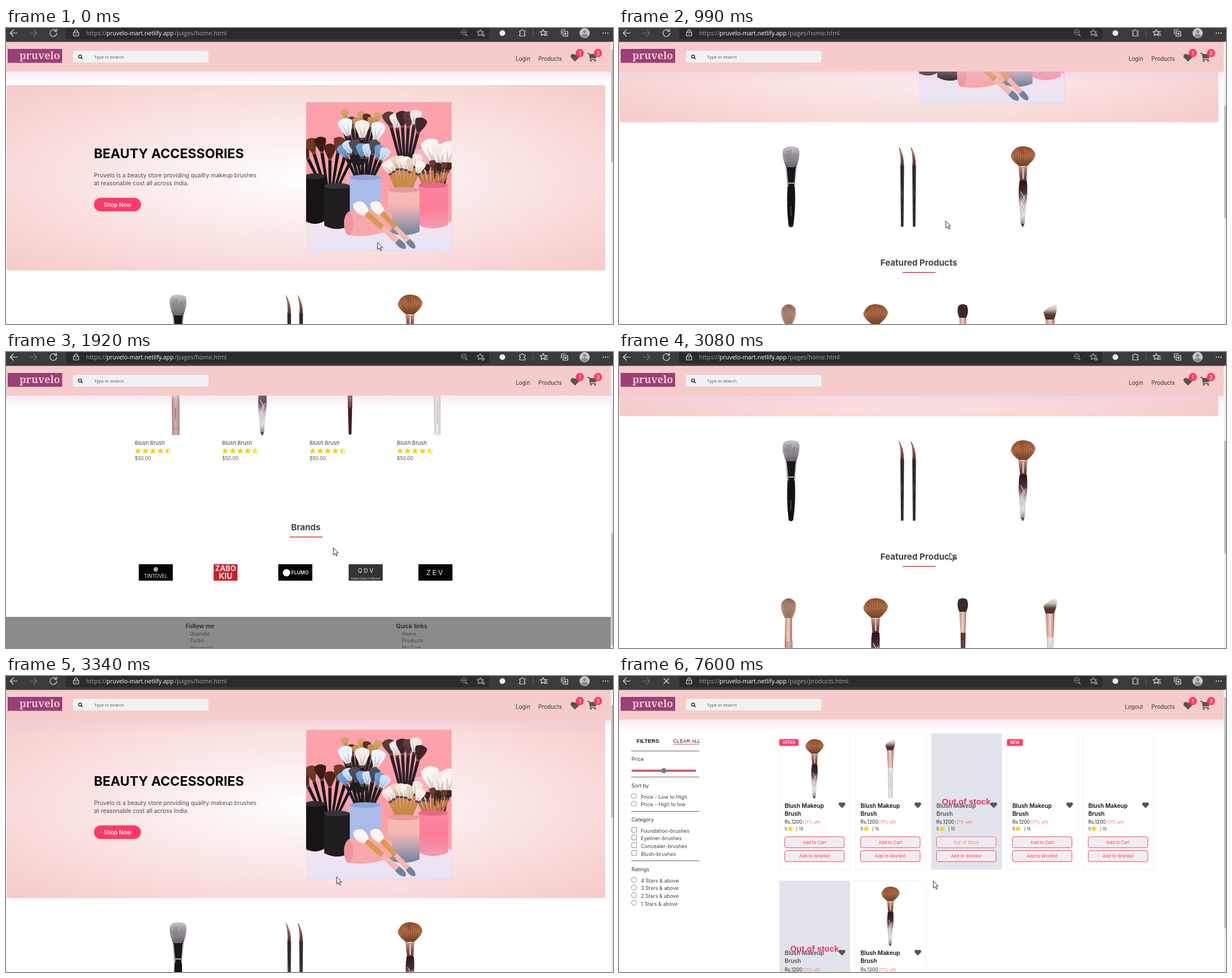
Write an HTML page that moves like this. It is 1070 by 523 pixels and loops after 8000 ms.

```html
<!DOCTYPE html>
<html lang="en">
<head>
<meta charset="utf-8">
<title>Beauty store</title>
<style>
  html, body { margin: 0; width: 100%; height: 100%; overflow: hidden; background: #fff; }
  svg { display: block; width: 1070px; height: 523px; font-family: Inter, sans-serif; }
  .shop { opacity: 0; }
  .arial { font-family: "Liberation Sans", Arial, sans-serif; }
  .ui { font-family: "Open Sans", sans-serif; }
  .serif { font-family: "Noto Serif", serif; }
  .mid { text-anchor: middle; }
  .line { fill: none; stroke: #e4e4e4; stroke-width: 1.2; stroke-linecap: round; stroke-linejoin: round; }
</style>
</head>
<body>
<svg id="stage" viewBox="0 0 1070 523"></svg>
<script>
const LOOP = 8000, SWITCH = 7600, PINK = '#ff3a68', GOLD = '#f9d31b';

// time, page scroll, cursor x, cursor y
const STEPS = [
  [0, 0, 655, 379], [840, 45, 640, 372], [890, 115, 608, 357], [940, 190, 584, 345],
  [990, 262, 576, 341], [1050, 345, 576, 341], [1150, 430, 576, 341],
  [1870, 630, 577, 346], [1920, 745, 577, 346], [2710, 490, 583, 355],
  [3080, 315, 583, 355], [3130, 248, 583, 355], [3180, 180, 583, 355], [3220, 122, 583, 355],
  [3280, 72, 583, 355], [3340, 36, 583, 355], [3400, 12, 583, 355], [3470, 0, 583, 355],
  [SWITCH, 0, 554, 362]
];

let seed = 7;
const rnd = () => (seed = seed * 16807 % 2147483647) / 2147483647;
const range = n => [...Array(n).keys()];
const text = (x, y, s, size, fill = '#333', more = '') =>
  `<text x="${x}" y="${y}" font-size="${size}" fill="${fill}" ${more}>${s}</text>`;
const rect = (x, y, w, h, fill, r = 0, more = '') =>
  `<rect x="${x}" y="${y}" width="${w}" height="${h}" rx="${r}" fill="${fill}" ${more}/>`;
const dot = (x, y, r, fill, more = '') => `<circle cx="${x}" cy="${y}" r="${r}" fill="${fill}" ${more}/>`;
const path = (d, fill, more = '') => `<path d="${d}" fill="${fill}" ${more}/>`;
const line = (d, more = '') => `<path class="line" d="${d}" ${more}/>`;
const at = (x, y, body, more = '') => `<g transform="translate(${x} ${y}) ${more}">${body}</g>`;
const group = (cls, body) => `<g class="${cls}">${body}</g>`;
const grad = (id, stops, dir = 'x2="0" y2="1"') =>
  `<linearGradient id="${id}" ${dir}>${stops.map((c, i) =>
    `<stop offset="${i / (stops.length - 1)}" stop-color="${c}"/>`).join('')}</linearGradient>`;

const starPath = (x, y, r, n = 10) => 'M' + range(n).map(i => {
  const a = i * Math.PI / 5 + Math.PI, q = i % 2 ? r * .48 : r;
  return (x + q * Math.sin(a)).toFixed(2) + ' ' + (y + q * Math.cos(a)).toFixed(2);
}).join('L') + 'Z';
const star = (x, y, r) => path(starPath(x, y, r), GOLD, `stroke="${GOLD}" stroke-linejoin="round"`);
const halfStar = (x, y, r) => path(starPath(x, y, r), 'none', `stroke="${GOLD}"`) + path(starPath(x, y, r, 6), GOLD);
const heart = (x, y, k) => at(x, y, path('M0 7L-6.6 .4C-9.4 -3 -5.2 -9 0 -4.4C5.2 -9 9.4 -3 6.6 .4Z', '#555'), `scale(${k})`);

// Brushes: centre x = 0, top y = 0, about 143 tall
const hairs = (w, h, dark, light) => range(26).map(i => {
  const x = (i / 25 * 2 - 1) * w * .9, top = h * (.08 + .35 * rnd() + .25 * (x / w) ** 2);
  return `<path d="M${x * .4} ${h}Q${x * .95} ${h * .6} ${x} ${top}" stroke="${i % 3 ? dark : light}" fill="none" stroke-width=".8" opacity=".45"/>`;
}).join('');

const powder = () => path('M-8 38C-13 27 -17 13 -13 5Q-9 0 0 0Q10 0 14 4C17 15 13 28 9 38Z', 'url(#grey)') +
  hairs(13, 37, '#4c4449', '#e6e2e6') + path('M-9 37L10 37L7 72H-6Z', '#17161a') +
  line('M-8 38L-5 71M9 38L6.500 71', 'stroke="#bbb"') + rect(-6, 64, 13, 2, '#aaa') +
  path('M-6 72H7Q9 110 4 141Q0 145 -4 141Q-8 108 -6 72Z', '#131216') +
  rect(-.5, 106, 1, 17, '#777');

const liner = () => path('M-6 0Q4 14 3 35H-3Q-1 22 -6 0Z', 'url(#rose)') + path('M-6 0L-3 8L-4 8Z', '#333') +
  path('M-3 34H3.500L2.500 142H-2Z', '#302a30') + rect(-.5, 78, 1, 11, '#6a6268');

const fan = () => path('M-7 35C-14 30 -23 21 -21 15Q-15 0 0 0Q17 0 22 14C22 22 14 29 7 35Z', 'url(#brown)') +
  hairs(20, 34, '#54291a', '#d09a66') + path('M-8 34Q0 39 8 34L6 62H-5Z', 'url(#rose)') +
  rect(-1, 38, 3, 20, '#e0b8a4', 1) +
  path('M-6 61H7Q9 82 5 110L3 137L0 143L-4 137L-6 110Q-9 82 -6 61Z', 'url(#glass)') +
  line('M-4 80L3 92L-4 107L3 124M5 86L-4 98L4 112L-3 130', 'stroke-width="1"') +
  path('M-3 137H2L0 143Z', '#333');

const blush = () => path('M-6 36C-13 25 -15 13 -11 6Q0 -6 11 6C15 14 12 25 6 36Z', 'url(#tan)') +
  hairs(11, 34, '#7c5a49', '#c4a18d') + path('M-6 35H6V76H-7Z', 'url(#roseH)') + path('M-7 76H7V142H-6Z', 'url(#pinkH)') +
  rect(-1, 94, 1.500, 20, '#94706d') + rect(-6, 130, 12, 1, '#9a746c');

const shader = () => path('M-6 25C-10 17 -10 8 -7 3Q0 -1 7 3C10 9 10 17 6 25Z', '#3a2a28') +
  path('M-6 25H6L5 62H-4Z', 'url(#roseH)') + path('M-4 62H5L3 140Q0 145 -2 140Z', 'url(#maroon)') +
  rect(0, 76, 1, 18, '#a88');

const angled = () => path('M-8 27L-12 14Q-3 3 11 0Q14 8 7 27Z', 'url(#whiteBrown)') +
  path('M-8 27H8L6 69H-6Z', 'url(#roseH)') + path('M-6 69H6V140Q0 145 -5 140Z', 'url(#ash)') +
  rect(0, 82, 1, 40, '#b5a9aa');

// Hero picture
const tuft = 'M-3 0C-5 -6 -10 -12 -9 -19Q0 -26 9 -19C10 -12 5 -6 3 0Z';
const bunch = (x, y, n, len, spread, k, colors, handle) => range(n).map(i => {
  const a = (i / (n - 1) * 2 - 1) * spread, r = len * (.78 + .34 * rnd());
  return at(x + a * .6, y, path(`M-2 10L-3 ${-r}H3L2 10Z`, handle) + rect(-3, -r, 6, 4, '#5f4c47') +
    at(0, -r, path(tuft, colors[i % colors.length]) + path('M-2 0L-4 -15L0 -4L4 -17L2 0Z', '#2a1a1a', 'opacity=".18"'), `scale(${k})`), `rotate(${a})`);
}).join('');
const cup = (x, y, w, h, fill, rim) =>
  path(`M${x} ${y}V${y + h}Q${x + w / 2} ${y + h + 12} ${x + w} ${y + h}V${y}Z`, fill) +
  `<ellipse cx="${x + w / 2}" cy="${y}" rx="${w / 2}" ry="5" fill="${rim}"/>`;
const lying = (x, y, turn, k) => at(x, y,
  path('M-5 0C-11 -8 -11 -20 -4 -27Q6 -27 10 -17Q10 -6 5 0Z', '#fcf5f3') + rect(-4.500, -1, 9, 36, '#d99a50', 1) +
  path('M-4 35H4L5 68H-5Z', '#f3b9ae') + path('M-5 68H5Q7 84 0 87Q-7 84 -5 68Z', '#74819b'),
  `rotate(${turn}) scale(${k})`);

const hero = () => `<g clip-path="url(#photo)">` + rect(529, 131, 257, 264, 'url(#wall)') +
  path('M529 345Q650 330 786 343V395H529Z', 'url(#table)') +
  cup(600, 225, 45, 55, '#f3a7b7', '#e68ea2') + cup(688, 210, 55, 70, '#f6b3c6', '#ea9bb2') +
  bunch(622, 232, 8, 66, 17, .8, ['#c69358', '#d3a468', '#5a3324'], '#252022') +
  bunch(704, 235, 6, 62, 15, 1.15, ['#5b3a3a', '#f3e8e8', '#41272b'], '#2a2024') +
  bunch(571, 278, 7, 60, 26, 1.15, ['#512619', '#713a25', '#3c1b15'], '#171417') +
  bunch(766, 278, 3, 43, 10, 1.7, ['#fdf5f1', '#f6ece7'], '#2c2022') +
  bunch(628, 265, 3, 70, 13, 1.4, ['#eef3fb', '#f6efec'], '#1f1c20') +
  bunch(632, 265, 8, 42, 25, 1.05, ['#6da0dc', '#cfe0f5', '#4d4c58'], '#1f1c20') +
  cup(526, 262, 37, 78, '#161416', '#302b30') + cup(561, 279, 45, 70, '#201d20', '#39343a') +
  cup(606, 264, 55, 84, '#a9bce9', '#8fa5dc') +
  bunch(752, 280, 7, 29, 24, .65, ['#44241e', '#6b3b2e'], '#b87841') +
  cup(727, 278, 52, 70, 'url(#hot)', '#e86784') +
  bunch(701, 286, 8, 40, 21, 1, ['#f6e8dc', '#fbf4ee', '#ecd4c2'], '#c88a45') +
  cup(673, 286, 56, 74, 'url(#dip)', '#e79a9b') +
  path('M603 325Q642 311 680 325V356Q642 372 604 366Q588 344 603 325Z', '#f7a8ac') +
  `<ellipse cx="604" cy="346" rx="8" ry="20" fill="#f1949b"/>` +
  lying(663, 327, -43, .98) + lying(636, 328, -48, 1.06) + '</g>';

const heading = (y, s) => text(528.500, y, s, 15.100, '#464243', 'class="mid" font-weight="700"') + rect(500, y + 11, 58, 1.800, '#e9505f');

const rating = x => text(x, 909, 'Blush Brush', 9.400, '#444') +
  range(4).map(i => star(x + 5.500 + i * 13.300, 920, 5)).join('') + halfStar(x + 58.700, 920, 5.200) + text(x, 936, '$50.00', 8.600, '#555');

const brand = (x, w, fill, body) => at(x, 1120, rect(0, 0, w, 29, fill) + body);
const name = (x, y, s, size, more = 'class="mid"') => text(x, y, s, size, '#eee', more);
const links = (x, y, items) => items.map((s, i) => text(x, y + i * 12.800, s, 8.800, '#505050', 'font-weight="500"')).join('');

const homePage = () => rect(1, 101, 1055.500, 327.500, 'url(#glow)', 4) +
  text(155, 229.500, 'BEAUTY ACCESSORIES', 23.100, '#080606', 'font-weight="700"') +
  text(155, 263.500, 'Pruvelo is a beauty store providing quality makeup brushes', 10.250, '#504a5a') +
  text(155, 277.500, 'at reasonable cost all across India.', 10.250, '#504a5a') +
  rect(155, 300, 83, 24, PINK, 12) + text(196.500, 315.500, 'Shop Now', 9.900, '#fff', 'class="mid" font-weight="500"') +
  hero() +
  at(303, 471, powder()) + at(499, 471, liner()) + at(520, 471, liner()) + at(712, 471, fan()) +
  heading(682, 'Featured Products') +
  at(299, 750, blush()) + at(452, 750, fan()) + at(606, 749, shader()) + at(760, 750, angled()) +
  [227, 381, 535, 689].map(rating).join('') +
  heading(1060, 'Brands') +
  brand(234, 60, '#050505', dot(30, 9, 4, '#aaa') + name(30, 24, 'TINTOVEL', 8.500)) +
  brand(366, 42, '#cf2029', name(21, 12, 'ZABO', 13, 'class="mid" font-weight="700"') + name(21, 26, 'KIU', 14, 'class="mid" font-weight="700"')) +
  brand(480, 60, '#050505', dot(14.500, 15, 6.500, '#fff') + name(23, 18, 'FLUMO', 8.500, 'font-weight="600"')) +
  brand(604, 60, '#333', name(30, 15, 'Q D V', 10) + name(30, 27, 'Studio Colour Collection', 4.600)) +
  brand(727, 60, '#050505', name(30, 18.500, 'ZEV', 12, 'class="mid" letter-spacing="3"')) +
  rect(0, 1213, 1066, 200, '#8b8b8b') +
  text(342, 1233, 'Follow me', 10.400, '#30262a', 'class="mid" font-weight="600"') + links(324, 1245.500, ['Quandle', 'Zorbit', 'Hovenast']) +
  text(715, 1233, 'Quick links', 10.400, '#30262a', 'class="mid" font-weight="600"') + links(698, 1245.500, ['Home', 'Products', 'My Cart']);

// Products page
const button = (y, s, faded) => rect(9.500, y, 105, 19.500, '#efefef', 3.500, `stroke="${PINK}" ${faded ? 'opacity=".75"' : ''}`) +
  text(62, y + 12.500, s, 7.700, faded ? '#ff7e9b' : PINK, 'class="mid"');

const card = (x, y, { pic = '', tag = '', out = false }) => at(x, y,
  rect(0, 0, 125, 241.500, out ? '#e3e3ec' : '#fff', 3, 'stroke="#f3f3f5"') +
  (pic && at(62, 10.500, pic, 'scale(.74)')) +
  (tag && rect(0, 10.500, tag.length * 3 + 19, 12, PINK, 2) +
    text(tag.length * 1.500 + 9.500, 19.200, tag, 7, '#fff', 'class="mid" font-weight="600"')) +
  ['Blush Makeup', 'Brush'].map((s, i) =>
    text(9.500, 131.500 + i * 14, s, 10.200, out ? '#555258' : '#111', 'font-weight="600"')).join('') +
  heart(110.500, 127, .78) +
  (out ? text(62, 125.500, 'Out of stock', 14.700, '#e8345d', 'class="arial mid" font-weight="700"') : '') +
  text(9.500, 160.300, 'Rs.1200', 8.500, '#222') + text(41.500, 160.300, '(17% off)', 7.300, '#ff6d6d') +
  text(9.500, 172.300, '5', 7.500, '#333') + star(19.500, 169, 4.800) + text(30, 172.300, '| 15', 7.500, '#333') +
  button(183, out ? 'Out of Stock' : 'Add to Cart', out) + button(207.500, 'Add to Wishlist'));

const options = (y, items, round) => items.map((s, i) => {
  const v = y + i * 13.600, edge = 'stroke="#777" stroke-width=".9"';
  return (round ? dot(26.500, v, 4.500, '#fff', edge) : rect(22.500, v - 4.500, 8.500, 8.500, '#fff', 1, edge)) + text(38.500, v + 4.800, s, 9, '#444');
}).join('');

const shopPage = () => rect(0, 24, 1066, 499, '#fff') +
  text(31, 118, 'FILTERS', 9.700, '#111', 'class="arial" font-weight="700"') +
  text(95.500, 118, 'CLEAR ALL', 9, '#222', 'class="arial"') + rect(95.500, 120, 46, 1, PINK) +
  [132.500, 178.500, 239.500, 326.500].map(y => rect(21.500, y - .5, 120, 1, '#666')).join('') +
  text(22, 150, 'Price', 9) + rect(22, 165.500, 114, 3.800, '#dc4c6c', 2) + dot(79, 167.300, 4.500, '#777') +
  text(22, 196.500, 'Sort by', 9) + options(212, ['Price - Low to High', 'Price - High to low'], true) +
  text(22, 257, 'Category', 9) + options(272, ['Foundation-brushes', 'Eyeliner-brushes', 'Concealer-brushes', 'Blush-brushes']) +
  text(22, 345, 'Ratings', 9) + options(360, [4, 3, 2, 1].map(n => n + ' Stars &amp; above'), true) +
  [{ pic: fan(), tag: 'OFFER' }, { pic: angled() }, { out: true }, { tag: 'NEW' }, {}, { out: true }, { pic: fan() }]
    .map((c, i) => card(282.500 + i % 5 * 133.800, i < 5 ? 101 : 361.500, c)).join('');

// Browser bar and site header
const url = page => text(297, 13, '/pages/' + page, 10.700, '#a2a2a2', 'class="ui"');
const badge = (x, s) => dot(x, 44.300, 7.200, PINK) + text(x, 47.600, s, 9, '#fff', 'class="mid" font-weight="500"');
const nav = s => text(924, 57.500, s, 9.800, '#333', 'text-anchor="end"');
const smallStar = (x, y) => line(starPath(x, y, 6), 'stroke-width="1"');

const chrome = () => rect(0, 77, 1066, 22, 'url(#shade)') + rect(0, 24, 1066, 53, '#f5cccb') +
  rect(0, 0, 1070, 24.500, '#3b3b3b') + path('M106 0H852V16Q852 20 848 20H110Q106 20 106 16Z', '#2b2b2b') +
  line('M20 9H7.500M13 3.500L7.500 9L13 14.500') + line('M42 9H54.500M49 3.500L54.500 9L49 14.500', 'style="stroke:#777"') +
  line('M119 7.500H128V14H119ZM121 7.500V5Q123.500 1 126 5V7.500') + dot(123.500, 10.700, 1, '#ddd') +
  text(141, 13, 'https://', 10.700, '#a2a2a2', 'class="ui"') + text(177, 13, 'pruvelo-mart.netlify.app', 10.500, '#fff', 'class="ui" font-weight="500"') +
  `<g opacity=".7">` + dot(807, 7.500, 4.300, 'none', 'stroke="#ddd"') + line('M810 11L813 14M805 7.500H809') + smallStar(836, 8.500) + dot(841, 12.500, 3, '#999') + '</g>' +
  dot(875, 9, 5, '#eee') +
  line('M905.500 5H908Q910 1 912 5H915V8Q911 9.500 915 11.500V14H905.500V11Q908 9.500 905.500 8Z') +
  rect(928.500, 3, 1, 13, '#666') + smallStar(947, 8.500) + line('M951 6.500H955M951 10H955M951 13H955') +
  line('M979 11V4Q979 3 980 3H986M982 6H990V14.500H982ZM986 8V12.500M984 10.200H988') +
  dot(1020, 9, 9, '#c9c6c9') + dot(1020, 6.500, 3, '#8d8a8f') + path('M1014 15Q1014 10.500 1020 10.500T1026 15Q1020 19 1014 15Z', '#8d8a8f') +
  [1053, 1057, 1061].map(x => dot(x, 9, 1.100, '#eee')).join('') +
  rect(3, 37, 96, 24.500, '#9a3f77') + text(59.500, 54.500, 'pruvelo', 18, '#f3c4d0', 'class="serif mid" font-weight="700"') +
  rect(118, 40.500, 239, 20.500, '#f1f1f1', 3) + dot(130.500, 50.300, 2.700, 'none', 'stroke="#222" stroke-width="1.4"') +
  path('M132.500 52.300L135 54.800', 'none', 'stroke="#222" stroke-width="1.600"') + text(155, 54, 'Type to search', 8, '#666', 'class="arial"') +
  text(938.500, 57.500, 'Products', 9.800) + heart(1003, 52, 1.050) +
  path('M1025 44H1028.500L1029 46H1041.500L1040 53.500H1030.500L1031 55H1039.500V56.500H1029.500L1027.500 45.800H1025Z', '#555') +
  dot(1031, 58, 1.600, '#555') + dot(1038.500, 58, 1.600, '#555') + badge(1011.500, '1') + badge(1043.500, '3') +
  rect(1066, 24.500, 4, 499, '#f1f1f1');

const defs = `<defs>
  <clipPath id="photo"><rect x="529" y="131" width="256.500" height="263.500"/></clipPath>
  <radialGradient id="glow" r=".7071"><stop stop-color="#fff"/><stop offset="1" stop-color="#f5cac9"/></radialGradient>
  <linearGradient id="shade" x2="0" y2="1"><stop stop-color="#efc6e4" stop-opacity=".38"/><stop offset="1" stop-color="#efc6e4" stop-opacity="0"/></linearGradient>` +
  grad('grey', ['#c9c6cc', '#a19ca4', '#8c8890', '#54494b']) + grad('rose', ['#c79a8c', '#8c5c50', '#4b2f2c']) +
  grad('brown', ['#8c4a2c', '#b26f44', '#6b3a26']) + grad('tan', ['#8a6658', '#b48f7c', '#a47a66']) +
  grad('glass', ['#2c1518', '#4a2b34', '#c8b9c8', '#dcd5de', '#77707a']) + grad('whiteBrown', ['#eeeaea', '#c9c0be', '#593c34', '#4a302a']) +
  grad('roseH', ['#b98470', '#f0d2c4', '#a86f5c'], '') + grad('pinkH', ['#a67d76', '#d6b3ab', '#b0867f'], '') +
  grad('maroon', ['#6a3a35', '#471c25', '#38222a']) + grad('ash', ['#c9c3c4', '#efecec', '#cdc6c7'], '') +
  grad('wall', ['#fda3ad', '#fd9ca6', '#fba7ae']) + grad('table', ['#f6e3ec', '#e6e4f6']) +
  grad('hot', ['#fb86a0', '#fb7c99', '#f19bb0']) + grad('dip', ['#f8bcb6', '#f6b7b3', '#b5a0ae', '#71829c']) + '</defs>';

document.getElementById('stage').innerHTML = defs +
  group('home', `<g id="page">${homePage()}</g>`) + group('shop', shopPage()) + chrome() +
  group('home', url('home.html') + nav('Login') + line('M88 5A6 6 0 1 0 89.500 9M89 2V6H85') +
    `<g id="thumb">${rect(1067, 38, 3, 199, '#bdbdbd')}</g>`) +
  group('shop', url('products.html') + nav('Logout') + line('M79 4.500L88 13.500M88 4.500L79 13.500') + rect(1067, 38, 3, 408, '#bdbdbd')) +
  `<g id="cursor">${path('M0 0V12.500L3 9.800L5 14.500L7 13.600L5 9H8.800Z', '#fff', 'stroke="#111" stroke-width=".9"')}</g>`;

const start = document.timeline.currentTime || 0;
const play = (el, frames) => {
  frames.push({ ...frames[frames.length - 1], offset: 1 });
  const run = el.animate(frames.map(f => ({ ...f, easing: 'steps(1, end)' })), { duration: LOOP, iterations: Infinity });
  run.startTime = start;
};
const move = (id, place) => play(document.getElementById(id),
  STEPS.map(([t, ...pose]) => ({ offset: t / LOOP, transform: `translate(${place(...pose)})` })));
const show = (cls, from, to) => document.querySelectorAll('.' + cls).forEach(el =>
  play(el, [{ offset: 0, opacity: from }, { offset: SWITCH / LOOP, opacity: to }]));

move('page', s => `0px, ${-s}px`);
move('thumb', s => `0px, ${s * .378}px`);
move('cursor', (s, x, y) => `${x}px, ${y}px`);
show('home', 1, 0);
show('shop', 0, 1);
</script>
</body>
</html>
```
